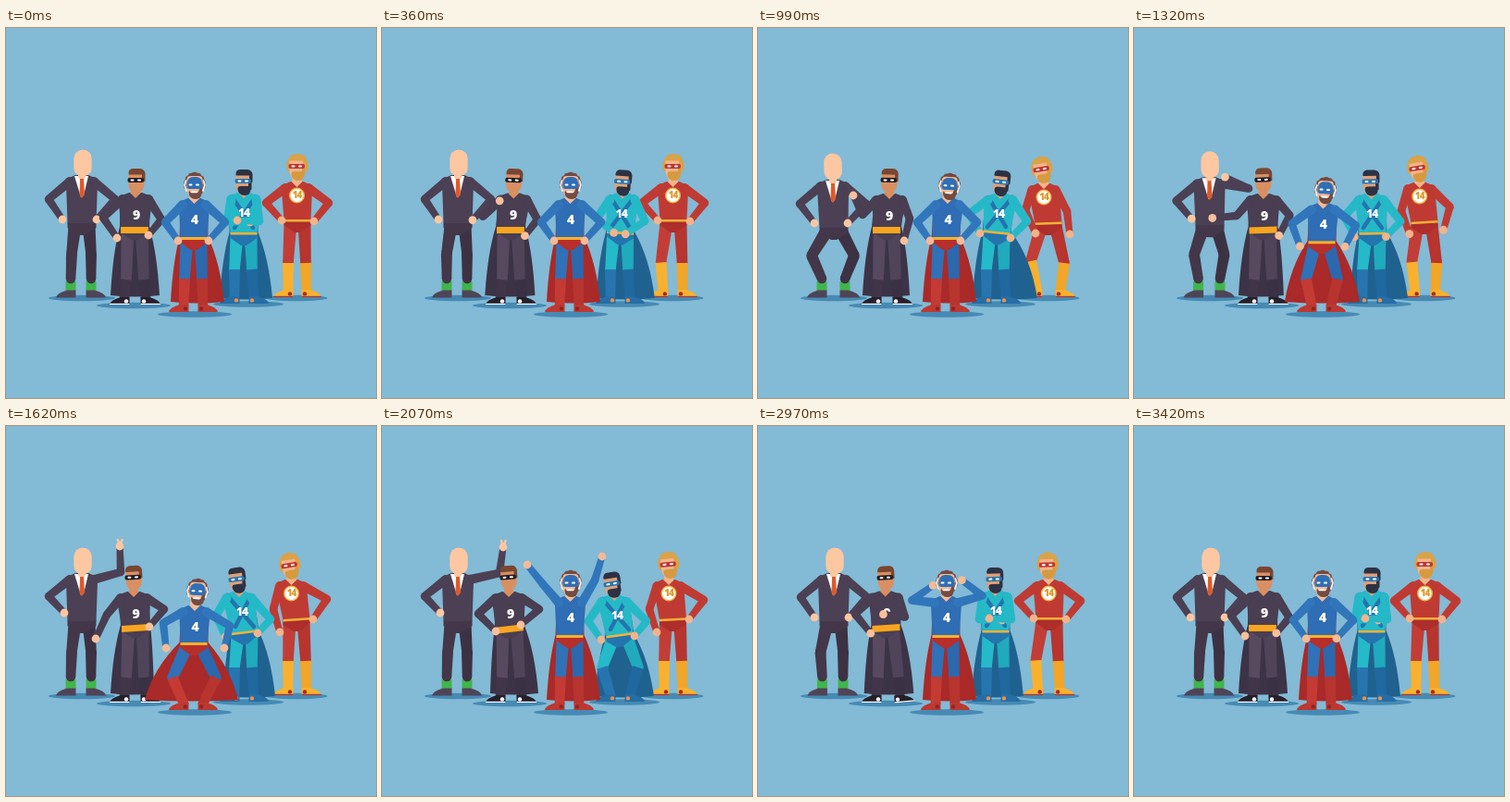
An HTML page with a canvas for the animation above (3.45 s loop, 400 by 400 pixels).

```html
<!DOCTYPE html>
<html>
<head>
<meta charset="utf-8">
<style>
  html, body { margin: 0; width: 100%; height: 100%; overflow: hidden; background: #83bad5; }
  canvas { display: block; width: 100vw; height: 100vh; }
</style>
</head>
<body>
<canvas id="stage" width="400" height="400"></canvas>
<script>
const ctx = document.getElementById('stage').getContext('2d');
const LOOP = 3450;
const KEYS = [0, 660, 990, 1620, 2070, 2580, LOOP];

// Drawing helpers
function ellipse(color, x, y, rx, ry = rx) {
  ctx.fillStyle = color;
  ctx.beginPath();
  ctx.ellipse(x, y, rx, ry, 0, 0, 7);
  ctx.fill();
}
function box(color, x, y, w, h, r = 0) {
  ctx.fillStyle = color;
  ctx.beginPath();
  ctx.roundRect(x, y, w, h, r);
  ctx.fill();
}
function poly(color, ...points) {
  ctx.fillStyle = color;
  ctx.beginPath();
  points.forEach(p => ctx.lineTo(...p));
  ctx.fill();
}
function line(color, width, ...points) {
  ctx.strokeStyle = color;
  ctx.lineWidth = width;
  ctx.beginPath();
  points.forEach(p => ctx.lineTo(...p));
  ctx.stroke();
}
function limb(color, a, b, wa, wb) {
  const angle = Math.atan2(b[1] - a[1], b[0] - a[0]);
  const nx = -Math.sin(angle) / 2, ny = Math.cos(angle) / 2;
  poly(color, [a[0] + nx * wa, a[1] + ny * wa], [b[0] + nx * wb, b[1] + ny * wb],
    [b[0] - nx * wb, b[1] - ny * wb], [a[0] - nx * wa, a[1] - ny * wa]);
  ellipse(color, ...b, wb / 2);
}
function label(text, color, size, x, y) {
  ctx.fontStretch = 'condensed';
  ctx.font = `800 ${size}px "Open Sans", sans-serif`;
  ctx.letterSpacing = '-1px';
  ctx.textAlign = 'center';
  ctx.textBaseline = 'middle';
  ctx.fillStyle = color;
  ctx.fillText(text, x, y);
}

// Heads are drawn around their own centre
function maskedHead({ skin, hair, mask, beard, curly, cowl }) {
  if (curly) {
    for (let i = 0; i < 9; i++) {
      const a = Math.PI * (0.92 + i * 0.145);
      ellipse(hair, Math.cos(a) * 8, Math.sin(a) * 9.5 - 1, 3.8);
    }
  }
  box(skin, -8.5, -10, 17, 23, [4, 4, 8, 8]);
  if (beard) {
    box(beard, -6.5, 5, 14, 10, [3, 2, 6, 7]);
    box(beard, 5, -1, 3.5, 10, 1);
  }
  if (cowl) {
    box(skin, -5.5, 2, 10, 6, 2);
    box('#fff', -4, 6.5, 7, 1.8, 1);
    box(mask, -8, -9, 16, 13, [6, 6, 2, 2]);
    line('#eaf1f7', 1.8, [-9.5, -5], [-10.8, 0], [-9, 6]);
    line('#eaf1f7', 1.8, [9.5, -5], [10.8, 0], [9, 6]);
  } else {
    box(hair, -8.5, -13, 18, 6.5, [5, 6, 1, 1]);
    box(hair, 6, -8, 3.5, 9, 1);
    box(mask, -9.5, -3, 17.5, 5, 2);
  }
  box('#fff', -6.5, -1.5, 4, 2, 1);
  box('#fff', 1, -1.5, 4, 2, 1);
}
function plainHead({ skin }) {
  box(skin, -9.7, -14.5, 19.4, 28.5, [9.7, 9.7, 8.5, 8.5]);
}

const suit = {
  skin: '#fdc7a2', body: '#4c4054', leg: ['#433749', '#3d3244'], boot: ['#433749', '#3d3244'],
  trunk: '#433749', foot: '#4f4457', sock: '#40b54b',
  shadow: [82, 292, 36], ground: 291.5, shoulder: 18, waist: 15.5, head: plainHead,
  mark([x, y]) {
    poly('#fff', [x - 8, y - 1], [x + 7, y - 1], [x + 2, y + 20], [x - 1, y + 22]);
    box(this.skin, x - 4, y - 5, 8, 8, [0, 0, 4, 4]);
    poly('#e0592a', [x - 2, y + 2], [x + 2, y + 2], [x + 3, y + 19], [x, y + 23], [x - 2.5, y + 19]);
  },
  base: {
    head: [83, 146], chest: [82, 161], hip: [82, 210], tilt: [0],
    elbowL: [46, 185], handL: [61, 207], elbowR: [118, 185], handR: [98, 207],
    kneeL: [71, 244], kneeR: [92, 244], ankleL: [70, 277], ankleR: [92, 277]
  },
  poses: [
    { kneeL: [69, 244], handR: [98, 208] },
    { head: [81, 150], chest: [81, 166], hip: [82, 215], elbowL: [45, 190], handL: [61, 211],
      elbowR: [117, 190], handR: [97, 211], kneeL: [58, 246], kneeR: [104, 246],
      ankleL: [69, 277], ankleR: [94, 277] },
    { elbowL: [46, 184], handL: [63, 202], elbowR: [124, 158], handR: [123, 130] },
    { elbowL: [46, 184], handL: [63, 202], elbowR: [127, 159], handR: [131, 131] },
    { kneeL: [65, 245], ankleL: [69, 277] }
  ]
};

const nine = {
  skin: '#d98f62', hand: '#f8c09c', hair: '#784632', mask: '#211d26',
  body: '#493e52', leg: ['#574a60', '#50445a'], boot: ['#403549', '#3b3144'],
  trunk: '#493e52', foot: '#25202b', sole: '#fff', ball: '#fff', belt: '#f9a51f', beltSize: 7,
  cape: '#3d3346', hem: 289,
  shadow: [138, 300, 40], ground: 299, shoulder: 19, waist: 15, head: maskedHead,
  mark([x, y], [hx]) { label('9', '#fff', 14, (x + hx) / 2 + 1, y + 23); },
  base: {
    head: [141, 165], chest: [140, 180], hip: [139, 215], tilt: [0],
    elbowL: [105, 205], handL: [120, 227], elbowR: [168, 207], handR: [154, 224],
    kneeL: [130, 272], kneeR: [149, 272], ankleL: [128, 291], ankleR: [151, 291], cape: [113, 166]
  },
  poses: [
    { head: [144, 165], chest: [144, 181], elbowL: [112, 203], handL: [101, 182], handR: [155, 225],
      cape: [110, 165] },
    { head: [142, 165], chest: [142, 181], elbowL: [113, 202], handL: [103, 181],
      elbowR: [164, 206], handR: [158, 230], cape: [113, 164] },
    { head: [138, 164], chest: [138, 181], hip: [140, 215], tilt: [-.07], elbowL: [109, 204],
      handL: [97, 230], elbowR: [171, 198], handR: [155, 217], cape: [113, 160] },
    { head: [137, 164], chest: [137, 181], hip: [138, 216], tilt: [-.12], elbowL: [104, 203],
      handL: [123, 222], elbowR: [170, 198], handR: [150, 215], cape: [117, 169] },
    { head: [136, 164], chest: [136, 181], hip: [138, 215], tilt: [-.13], elbowL: [105, 202],
      handL: [123, 222], elbowR: [153, 205], handR: [137, 186], kneeR: [154, 271],
      ankleR: [155, 289], cape: [116, 170] }
  ]
};

const four = {
  skin: '#f4bb97', hair: '#754a41', beard: '#754a41', mask: '#2f6fb7', curly: true, cowl: true,
  body: '#2f6db4', arm: '#3176bb', leg: ['#3071b8', '#2c68ae'], boot: ['#c33b34', '#b8342f'],
  trunk: '#b72f2b', foot: '#bd3831', ball: '#8f2524', belt: '#f7b02b', beltSize: 3,
  cape: '#a92a28', hem: 296,
  shadow: [204, 309.5, 40], ground: 307, shoulder: 17.5, waist: 14.5, head: maskedHead,
  mark([x, y]) { label('4', '#fff', 14, x, y + 22); },
  base: {
    head: [204, 170], chest: [203.5, 186], hip: [203, 226], tilt: [0],
    elbowL: [172, 210], handL: [186, 230], elbowR: [237, 210], handR: [219, 230],
    kneeL: [193, 271], kneeR: [212, 271], ankleL: [192, 300], ankleR: [213, 300], cape: [178, 236]
  },
  poses: [
    {},
    { head: [207, 171], chest: [205, 186] },
    { head: [207, 179], chest: [204, 196], hip: [203, 234], elbowL: [170, 213], handL: [173, 240],
      elbowR: [242, 216], handR: [236, 240], kneeL: [180, 272], kneeR: [227, 272], cape: [150, 251] },
    { elbowL: [174, 171], handL: [157, 150], elbowR: [230, 167], handR: [238, 141] },
    { elbowL: [174, 175], handL: [168, 145], elbowR: [230, 168], handR: [235, 140] }
  ]
};

const teal = {
  skin: '#e0a077', hand: '#f0b48e', hair: '#2c3244', beard: '#2c3244', mask: '#2676b4',
  body: '#25b9c8', leg: ['#25bac9', '#20aabd'], boot: ['#2775af', '#2068a0'],
  trunk: '#2474ae', foot: '#256ea6', ball: '#e6924c', belt: '#f5b335', beltSize: 2.5,
  cape: '#20628f', hem: 292,
  shadow: [262, 298.5, 38], ground: 298, shoulder: 18.5, waist: 14.5, head: maskedHead,
  mark([x, y], [hx, hy]) {
    line('#2474ae', 4.5, [x - 13, y + 2], [hx + 10, hy - 5]);
    line('#2474ae', 4.5, [x + 13, y + 2], [hx - 10, hy - 5]);
    label('14', '#fff', 12, (x + hx) / 2, y + 21);
  },
  base: {
    head: [257, 166], chest: [257, 180], hip: [257, 221], tilt: [0],
    elbowL: [239, 209], handL: [264, 210], elbowR: [274, 209], handR: [250, 208],
    kneeL: [247, 261], kneeR: [266, 261], ankleL: [247, 291], ankleR: [268, 291], cape: [231, 288]
  },
  poses: [
    { head: [263, 167], chest: [262, 181], hip: [258, 220], tilt: [.1], elbowL: [228, 201],
      handL: [237, 223], elbowR: [292, 207], handR: [279, 230], cape: [232, 300] },
    { head: [263, 167], chest: [262, 181], hip: [258, 220], tilt: [.1], elbowL: [228, 201],
      handL: [240, 222], elbowR: [291, 209], handR: [273, 227], cape: [232, 302] },
    { head: [250, 166], chest: [252, 181], hip: [258, 222], tilt: [-.12], elbowL: [227, 205],
      handL: [237, 228], elbowR: [286, 209], handR: [272, 224], cape: [235, 291] },
    { head: [249, 171], chest: [251, 185], hip: [257, 225], tilt: [-.13], elbowL: [223, 211],
      handL: [237, 231], elbowR: [286, 211], handR: [273, 227], kneeL: [238, 261],
      kneeR: [277, 261], cape: [230, 294] },
    { head: [255, 166], chest: [256, 180], cape: [231, 286] }
  ]
};

const red = {
  skin: '#f2b48c', hair: '#dba247', beard: '#d79a40', mask: '#bd3630', curly: true,
  body: '#bf3a33', leg: ['#c23d36', '#b7342f'], boot: ['#f9b12d', '#f2a526'],
  trunk: '#ad2e2b', foot: '#f9b12d', sole: '#b72f2b', ball: '#a82a28', belt: '#f6b136', beltSize: 2.5,
  shadow: [314, 292, 33.5], ground: 291, shoulder: 17.5, waist: 14.5, head: maskedHead,
  mark([x, y]) {
    ellipse('#f3b544', x, y + 13, 8.5);
    ellipse('#fff', x, y + 13, 7);
    label('14', '#dd9a2b', 10, x, y + 13.5);
  },
  base: {
    head: [315, 150], chest: [314.5, 168], hip: [315, 207], tilt: [0],
    elbowL: [281, 189], handL: [298, 208], elbowR: [349, 189], handR: [333, 209],
    kneeL: [305, 254], kneeR: [324, 254], ankleL: [305, 284], ankleR: [325, 284]
  },
  poses: [
    { kneeL: [299, 253], kneeR: [325, 254], ankleL: [303, 284] },
    { head: [307, 153], chest: [309, 170], hip: [314, 210], tilt: [-.04], elbowL: [289, 197],
      handL: [300, 222], elbowR: [334, 198], handR: [337, 223], kneeL: [295, 252],
      kneeR: [331, 254], ankleL: [302, 284], ankleR: [327, 284] },
    { head: [307, 151], chest: [308.5, 168], hip: [314, 208], tilt: [-.07], elbowL: [289, 198],
      handL: [296, 223], elbowR: [347, 187], handR: [332, 209] },
    { head: [310, 150], chest: [310, 168], hip: [314.5, 208], tilt: [-.05], elbowL: [289, 198],
      handL: [297, 223], elbowR: [348, 188], handR: [332, 209] },
    { head: [312, 151], chest: [314, 168], kneeL: [297, 253], kneeR: [325, 254],
      ankleL: [301, 284], ankleR: [327, 284] }
  ]
};

const heroes = [suit, red, nine, teal, four];
const sides = [['L', -1], ['R', 1]];
const mix = (a, b, u) => a + (b - a) * u;
const shoulderOf = (h, [x, y], dir) => [x + dir * (h.shoulder - 5), y + 5];

// Swings a bone from one direction to another, so that arms move on arcs
function swing(pivot, fromPivot, from, toPivot, to, u) {
  const ax = from[0] - fromPivot[0], ay = from[1] - fromPivot[1];
  const bx = to[0] - toPivot[0], by = to[1] - toPivot[1];
  const turn = Math.atan2(ax * by - ay * bx, ax * bx + ay * by);
  const angle = Math.atan2(ay, ax) + turn * u;
  const length = mix(Math.hypot(ax, ay), Math.hypot(bx, by), u);
  return [pivot[0] + Math.cos(angle) * length, pivot[1] + Math.sin(angle) * length];
}

function poseAt(h, time) {
  const frames = [{}, ...h.poses, {}].map(changes => ({ ...h.base, ...changes }));
  const i = KEYS.findIndex(k => k > time) - 1;
  const from = frames[i], to = frames[i + 1];
  const u = (time - KEYS[i]) / (KEYS[i + 1] - KEYS[i]);
  const ease = u * u * (3 - 2 * u);
  const pose = {};
  for (const joint in h.base) pose[joint] = from[joint].map((v, n) => mix(v, to[joint][n], ease));
  for (const [side, dir] of sides) {
    const elbow = 'elbow' + side, hand = 'hand' + side;
    const [now, a, b] = [pose, from, to].map(p => shoulderOf(h, p.chest, dir));
    pose[elbow] = swing(now, a, from[elbow], b, to[elbow], ease);
    pose[hand] = swing(pose[elbow], from[elbow], from[hand], to[elbow], to[hand], ease);
  }
  return pose;
}

function drawCape(h, { chest: [x, y], hip: [hx, hy], cape: [left, right] }) {
  const s = h.shoulder - 3, w = h.waist + 1;
  ctx.fillStyle = h.cape;
  ctx.beginPath();
  ctx.moveTo(x - s, y + 2);
  ctx.lineTo(hx - w, hy);
  ctx.quadraticCurveTo(mix(hx - w, left, .75), hy + 28, left, h.hem);
  ctx.quadraticCurveTo((left + right) / 2, h.hem + 3, right, h.hem);
  ctx.quadraticCurveTo(mix(hx + w, right, .75), hy + 28, hx + w, hy);
  ctx.lineTo(x + s, y + 2);
  ctx.fill();
}

function drawFoot(h, [x, y], dir, lift) {
  ctx.save();
  ctx.translate(x, h.ground);
  ctx.rotate(-lift * 0.08);
  ctx.scale(dir, 1);
  ctx.fillStyle = h.foot;
  ctx.beginPath();
  ctx.moveTo(-5.5, 0);
  ctx.lineTo(-5.5, -8);
  ctx.lineTo(4, -8);
  ctx.quadraticCurveTo(15, -5, 16, 0);
  ctx.fill();
  if (h.sole) box(h.sole, -5.5, -1.2, 21.5, 1.2);
  if (h.ball) ellipse(h.ball, -2, -3.6, 2.2);
  ctx.restore();
}

function drawHero(h, p) {
  const { chest, hip } = p;
  const [cx, cy] = chest;
  const at = (dx, dy) => [hip[0] + dx, hip[1] + dx * p.tilt[0] + dy];
  const { shoulder: s, waist: w } = h;

  if (h.cape) drawCape(h, p);

  sides.forEach(([side, dir], i) => {
    const ankle = p['ankle' + side], knee = p['knee' + side];
    if (h.sock) box(h.sock, ankle[0] - 5.5, 274, 11, 10);
    const shin = h.sock ? [ankle[0], 271] : ankle;
    limb(h.leg[i], at(dir * 7.5, 4), knee, 14, 11.5);
    limb(h.boot[i], knee, shin, 12, 10.5);
    drawFoot(h, ankle, dir, h.base['ankle' + side][1] - ankle[1]);
  });

  poly(h.trunk, at(-w, 0), at(w, 0), at(w, 6), at(3, 14), at(-3, 14), at(-w, 6));
  poly(h.body, [cx - 7, cy - 2], [cx + 7, cy - 2], [cx + s - 4, cy + 1], [cx + s - 1, cy + 7],
    at(w, 1), at(-w, 1), [cx - s + 1, cy + 7], [cx - s + 4, cy + 1]);
  if (h.belt) poly(h.belt, at(-w, 0), at(w, 0), at(w, h.beltSize), at(-w, h.beltSize));

  if (h !== suit) {
    box(h.skin, cx - 5, cy - 6, 10, 5);
    poly(h.skin, [cx - 6, cy - 2], [cx + 6, cy - 2], [cx, cy + 4]);
  }
  h.mark(chest, hip);

  for (const [side, dir] of sides) {
    const shoulder = shoulderOf(h, chest, dir);
    const elbow = p['elbow' + side], hand = p['hand' + side];
    const color = h.arm || h.body, skin = h.hand || h.skin;
    ellipse(color, ...shoulder, 5);
    limb(color, shoulder, elbow, 10, 8.5);
    limb(color, elbow, hand, 8.5, 7);
    ellipse(skin, ...hand, 4.4);
    if (h === suit && hand[1] < 150) {
      line(skin, 2.4, hand, [hand[0] - 2, hand[1] - 7]);
      line(skin, 2.4, hand, [hand[0] + 2.5, hand[1] - 7]);
    }
  }

  ctx.save();
  ctx.translate(...p.head);
  ctx.rotate((p.head[0] - h.base.head[0]) * 0.02);
  h.head(h);
  ctx.restore();
}

function render(time) {
  ctx.fillStyle = '#83bad5';
  ctx.fillRect(0, 0, 400, 400);
  ctx.lineCap = ctx.lineJoin = 'round';
  heroes.forEach(({ shadow: [x, y, rx] }) => ellipse('#468ab4', x, y, rx, 3.3));
  heroes.forEach(h => drawHero(h, poseAt(h, time)));
}

const start = performance.now();
function tick() {
  render((performance.now() - start) % LOOP);
  requestAnimationFrame(tick);
}
tick();
</script>
</body>
</html>
```
